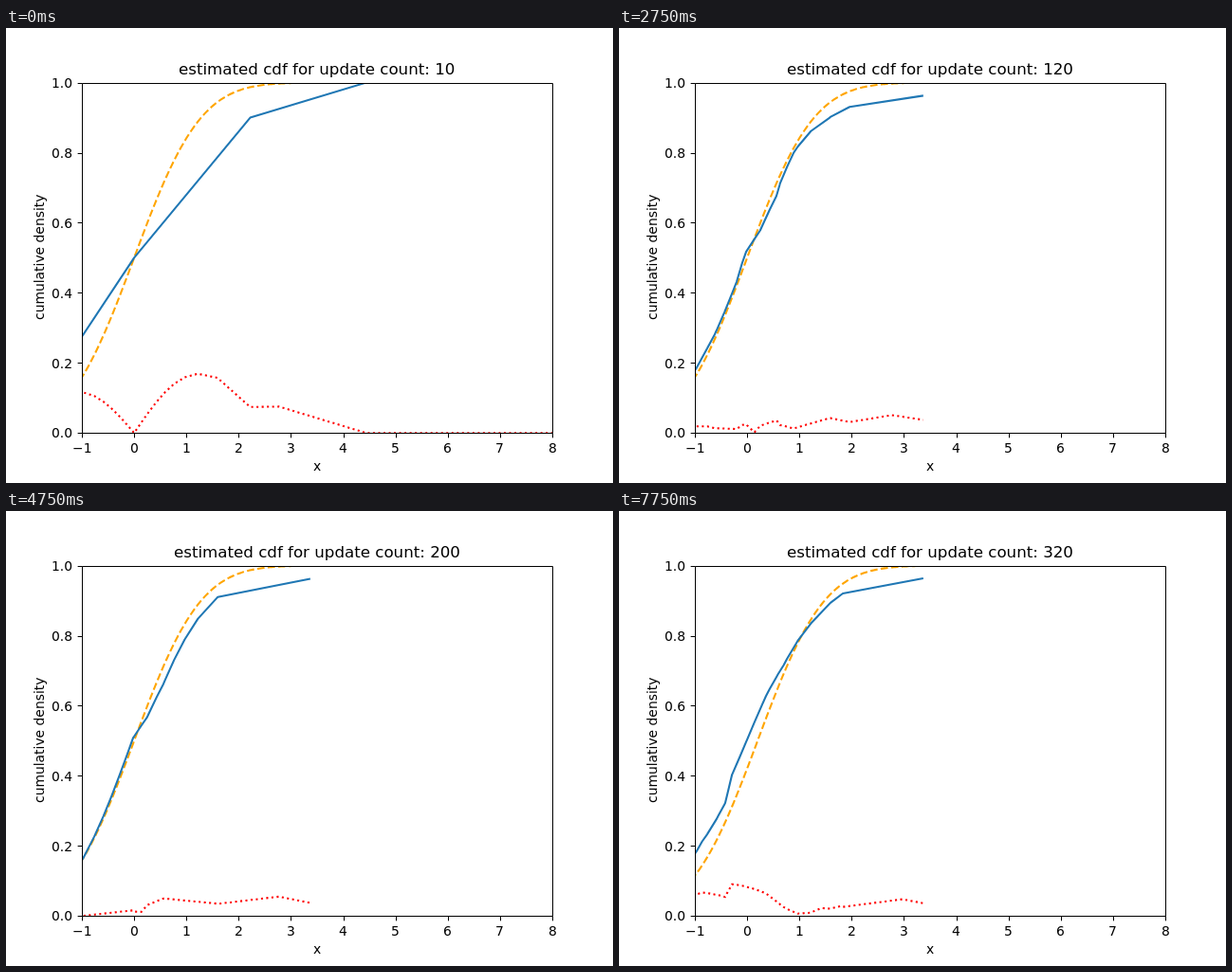
An HTML page with a canvas for the animation above (8 s loop, 640x480 px).

```html
<!DOCTYPE html>
<html lang="en">
<head>
<meta charset="utf-8">
<title>Estimated cdf</title>
<style>
  html, body { margin: 0; width: 100%; height: 100%; overflow: hidden; background: #fff; }
  canvas { display: block; }
</style>
</head>
<body>
<canvas id="plot" width="640" height="480"></canvas>
<script>
const ctx = document.getElementById('plot').getContext('2d');
const LEFT = 80, RIGHT = 576, TOP = 57.6, BOTTOM = 427.2;
const STEP_MS = 250, STEPS = 32;
const UNIT = (RIGHT - LEFT) / 9;
const px = x => LEFT + (x + 1) * UNIT;
const py = y => BOTTOM - y * (BOTTOM - TOP);
const toStage = ([x, y]) => [px(x), py(y)];
const snap = v => Math.round(v) + 0.5;
const ascending = (a, b) => a - b;

function normalCdf(z) {
  const t = 1 / (1 + 0.2316419 * Math.abs(z));
  const poly = t * (.31938153 + t * (-.356563782 + t * (1.781477937 + t * (-1.821255978 + t * 1.330274429))));
  const tail = Math.exp(-z * z / 2) / Math.sqrt(2 * Math.PI) * poly;
  return z > 0 ? 1 - tail : tail;
}

function normalQuantile(p) {
  let low = -2.77, high = 2.77;
  for (let i = 0; i < 30; i++) {
    const mid = (low + high) / 2;
    if (normalCdf(mid) < p) low = mid; else high = mid;
  }
  return low;
}

function interpolate(points, x) {
  const i = points.findIndex(p => p[0] >= x);
  if (i < 0) return points[points.length - 1][1];
  if (i === 0) return points[0][1];
  const [x0, y0] = points[i - 1], [x1, y1] = points[i];
  return y0 + (y1 - y0) * (x - x0) / (x1 - x0);
}

// The exact cdf, sampled at equally spaced levels.
const reference = Array.from({ length: 19 }, (_, i) => [normalQuantile(i / 18), i / 18]);

// An estimate is the exact cdf plus a bias, kinked at the quantiles and the bias points.
function biasedFit(count, bias) {
  const xs = [...reference.slice(0, -1), ...bias].map(p => p[0]).sort(ascending);
  return { count, points: xs.map(x => [x, normalCdf(x) + interpolate(bias, x)]) };
}

const fits = [
  { count: 10, points: [0, .5, .9, 1, 1, 1].map((y, i) => [2.22 * (i - 1), y]) },
  biasedFit(50, [[-1, .09], [0, .102], [.6, 0], [1.5, -.046], [1.96, -.022], [3.84, 0]]),
  biasedFit(90, [[-.62, 0], [-.1, .034], [.62, -.038], [.89, -.008], [1.58, -.043], [1.96, -.023], [3.84, 0]]),
  biasedFit(150, [[-.76, .038], [-.2, -.005], [-.02, .024], [.25, -.04], [.56, -.04], [.63, -.009], [1.6, -.043], [3.37, -.062]]),
  biasedFit(200, [[-1, 0], [-.02, .016], [.25, -.031], [.56, -.05], [1.6, -.035], [3.37, -.037]]),
  biasedFit(240, [[-.76, .029], [-.55, .004], [-.38, .026], [-.02, .018], [.56, -.048], [1.6, -.04], [3.37, -.039]]),
  biasedFit(320, [[-.86, .018], [-.42, -.015], [-.29, .017], [.36, -.013], [.7, -.042], [1.32, -.056], [1.83, -.046], [3.37, -.036]])
];

function estimate(count) {
  const i = fits.findIndex(f => f.count >= count);
  const to = fits[i], from = fits[Math.max(i - 1, 0)];
  const share = i ? (count - from.count) / (to.count - from.count) : 1;
  const end = count <= 10 ? 8.88 : count <= 100 ? 3.84 : 3.37;
  return [...from.points, ...to.points]
    .map(p => p[0])
    .filter(x => x < end)
    .concat(end)
    .sort(ascending)
    .map(x => [x, (1 - share) * interpolate(from.points, x) + share * interpolate(to.points, x)]);
}

function line(points, color, width, dash = []) {
  ctx.beginPath();
  for (const [x, y] of points) ctx.lineTo(x, y);
  ctx.strokeStyle = color;
  ctx.lineWidth = width;
  ctx.lineJoin = 'round';
  ctx.setLineDash(dash);
  ctx.stroke();
}

// Text starts on a whole pixel; anchor is 0.5 for centred, 1 for right aligned.
function label(text, x, y, anchor = 0.5, size = 13.889) {
  ctx.font = `${size}px "DejaVu Sans", sans-serif`;
  ctx.fillStyle = '#000';
  ctx.fillText(text, Math.round(x - anchor * ctx.measureText(text).width), Math.round(y));
}

function drawAxes(count) {
  const l = snap(LEFT), b = snap(BOTTOM), tick = 4.86;
  for (let i = 0; i <= 9; i++) {
    const x = px(i - 1);
    line([[snap(x), b], [snap(x), b + tick]], '#000', 1);
    label(i ? i - 1 : '\u22121', x, 448);
  }
  for (let i = 0; i <= 5; i++) {
    const y = py(i / 5);
    line([[l, snap(y)], [l - tick, snap(y)]], '#000', 1);
    label((i / 5).toFixed(1), 70.3, y + 5.28, 1);
  }
  ctx.setLineDash([]);
  ctx.strokeRect(l, snap(TOP), RIGHT - LEFT, b - snap(TOP));
  label('x', 328, 467);
  ctx.save();
  ctx.translate(40, 242);
  ctx.rotate(-Math.PI / 2);
  label('cumulative density', 0, 0);
  ctx.restore();
  label('estimated cdf for update count: ' + count, 328, 49, 0.5, 16.667);
}

function drawCurves(count) {
  const mean = Math.max(0, count - 300) * 0.01;
  const fit = estimate(count);
  const end = fit[fit.length - 1][0];
  const shifted = reference.map(([x, y]) => [x + mean, y]);

  // Dashes run from just outside the stage.
  const exact = [];
  for (let x = -1 - (LEFT + 1) / UNIT; x <= end; x += 0.03) exact.push([x, normalCdf(x - mean)]);

  const error = [...fit, ...shifted]
    .map(p => p[0])
    .filter(x => x <= end)
    .sort(ascending)
    .map(x => [x, Math.abs(interpolate(shifted, x) - interpolate(fit, x))]);

  ctx.save();
  ctx.beginPath();
  ctx.rect(LEFT, Math.round(TOP), RIGHT - LEFT, Math.round(BOTTOM) - Math.round(TOP));
  ctx.clip();
  line(exact.map(toStage), '#ffa500', 2.083, [7.708, 3.333]);
  line(fit.map(toStage), '#1f77b4', 2.083);
  line(error.map(toStage), '#f00', 2.083, [2.083, 3.4375]);
  ctx.restore();
}

function draw() {
  const step = Math.floor(performance.now() / STEP_MS) % STEPS;
  const count = 10 * (step + 1);
  ctx.fillStyle = '#fff';
  ctx.fillRect(0, 0, 640, 480);
  drawCurves(count);
  drawAxes(count);
  requestAnimationFrame(draw);
}
draw();
</script>
</body>
</html>
```
